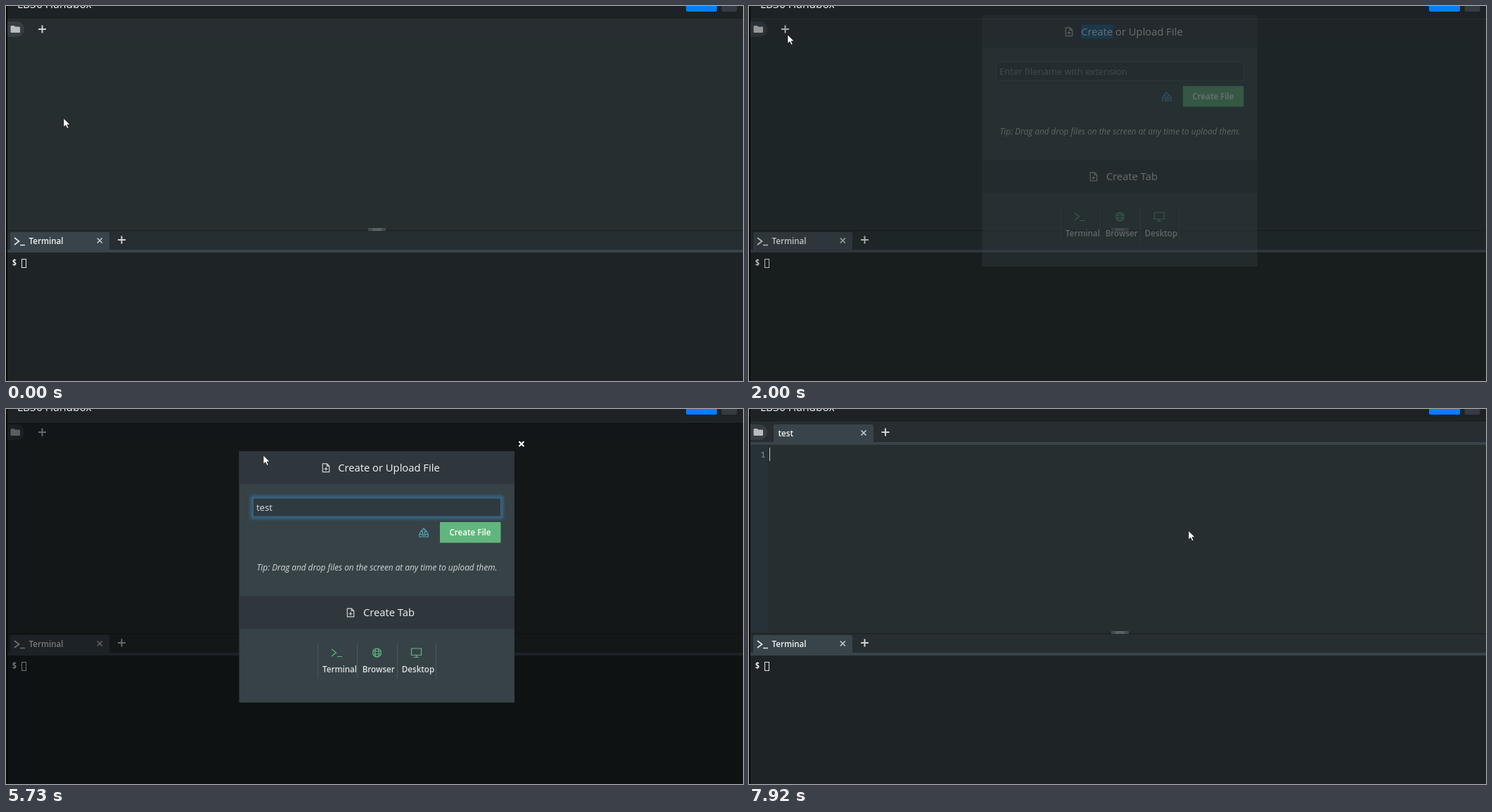
These frames come from a looping animation (1048x534 px, 8 s). An HTML page:

```html
<!DOCTYPE html>
<html lang="en">
<head>
<meta charset="utf-8">
<title>Sandbox</title>
<style>
html, body { margin: 0; width: 100%; height: 100%; overflow: hidden; background: #1e2426; }
svg { display: block; width: 1048px; height: 534px; font-family: "Open Sans", "Noto Sans", sans-serif; }
.mono { font-family: "Noto Sans Mono", monospace; font-size: 11.5px; }
.label { font-size: 11.6px; font-weight: 600; }
.head { font-size: 14.75px; fill: #f4f5f5; }
.mid { text-anchor: middle; }
.line { fill: none; stroke: #d0d3d4; }
.green { stroke: #5fb87f; stroke-width: 1.2; }
.tab { fill: #39444a; }
</style>
</head>
<body>
<svg viewBox="0 0 1048 534">
  <defs>
    <filter id="blur" x="-10%" y="-60%" width="120%" height="220%"><feGaussianBlur stdDeviation="2"/></filter>
    <path id="plus" class="line" stroke-width="2" d="M-5.5 0h11M0-5.5v11"/>
    <path id="cross" d="M-3.5-3.5l7 7m0-7l-7 7" fill="none"/>
    <path id="prompt" fill="none" d="M0 0l6.500 5-6.500 5M8 10.500h7"/>
    <g id="doc" class="line" stroke="#f0f2f2" stroke-width="1.200">
      <path d="M.6.600h6l3.400 3.400v8.400H.6zM6.600.600v3.400h3.400M5.300 5.500v5M2.800 8h5"/>
    </g>
  </defs>

  <rect width="1048" height="534" fill="#1e2426"/>
  <rect width="1048" height="19" fill="#1d2225"/>
  <text x="16" y="2.500" font-size="15.500" fill="#f0f1f1">LB36 Handbox</text>
  <rect x="967" y="-20" width="44" height="28" rx="2.500" fill="#067cff"/>
  <text class="label mid" x="989" y="0" fill="#dcebff">Share</text>
  <rect x="1017.500" y="-20" width="22" height="28" rx="2.500" fill="#353b42"/>

  <rect y="19" width="1048" height="300" fill="#262e30"/>
  <rect y="18" width="1048" height="29" fill="#272d30"/>
  <path d="M2 22h13a11 11 0 0 1 0 22H2z" fill="#353f43"/>
  <path d="M6.500 29.200q0-1.200 1.200-1.200h4l1.500 1.500h5.600q1.200 0 1.200 1.200v6.100q0 1.200-1.200 1.200H7.700q-1.200 0-1.200-1.200z" fill="#babcbd"/>
  <g id="emptyBar">
    <circle id="hover" cx="51.500" cy="33.300" r="11.700" fill="#4a4f52"/>
    <use href="#plus" x="51.500" y="33"/>
  </g>
  <g id="fileBar">
    <rect x="2" y="51" width="25" height="267" fill="#263238"/>
    <path class="tab" d="M35 47V24q0-2 2-2h138q2 0 2 2v23h871v4H2v-4z"/>
    <text class="label" x="41.500" y="39" fill="#f2f3f3">test</text>
    <use href="#cross" x="163" y="34" stroke="#c3c7c9" stroke-width="1.700"/>
    <use href="#plus" x="194" y="33"/>
    <text class="mono" x="16.500" y="68.500" fill="#929a9d">1</text>
    <path id="editCaret" d="M29.500 55v19" stroke="#c9cdcf"/>
  </g>

  <rect x="515" y="316" width="25" height="4.500" rx="1" fill="#444c50"/>
  <path d="M521 317.500h13M521 319.500h13" stroke="#7b8387" stroke-width=".8"/>
  <rect y="320.500" width="1048" height="28" fill="#262e31"/>
  <path class="tab" d="M6 347v-23q0-2 2-2h137q2 0 2 2v23h901v4H2v-4z"/>
  <use href="#prompt" x="12" y="330" stroke="#e4e6e7" stroke-width="1.600"/>
  <text class="label" x="32.500" y="339" fill="#f2f3f3">Terminal</text>
  <use href="#cross" x="133.300" y="334" stroke="#c3c7c9" stroke-width="1.700"/>
  <use href="#plus" x="164.500" y="333"/>
  <text class="mono" x="8.500" y="370" fill="#f2f2f2" font-weight="600">$</text>
  <rect x="22.500" y="360.500" width="6" height="12" fill="none" stroke="#e6e6e6"/>
  <rect width="2" height="534" fill="#050606"/>

  <g id="tip">
    <rect x="7" y="51" width="89.500" height="19.500" rx="2.500" fill="#475866"/>
    <text class="mid" x="51.700" y="64.700" font-size="10.700" fill="#fff">New File or Tab</text>
  </g>

  <rect id="dim" x="2" y="19" width="1046" height="515" fill="#000"/>

  <g id="modal">
    <rect x="331.500" y="60" width="391.500" height="358" fill="#374247"/>
    <path d="M331.500 60h391.500v46.700h-391.500zM331.500 266h391.500v47h-391.500z" fill="#2f373d"/>
    <rect id="select" x="472" y="73.500" width="45.300" height="20" fill="#145d92"/>
    <use href="#doc" x="449.700" y="77.300"/>
    <text class="head mid" x="544.500" y="88.700">Create or Upload File</text>
    <rect id="glow" x="350" y="125.500" width="355" height="29" fill="none" stroke="#3683b8" stroke-width="3" filter="url(#blur)"/>
    <rect id="field" x="351.500" y="127" width="352" height="26" fill="#2f3940"/>
    <text id="value" x="356" y="145" font-size="13.100"></text>
    <path id="caret" d="M.5 131v18" stroke="#e4e6e7"/>
    <path id="upload" fill="none" stroke-width="1.200" d="M591 175h-1.300l-2 3.500v3.500h12.600v-3.500l-2-3.500H597M587.700 178.500h3.500l.8 1.500h4l.8-1.500h3.500M592.500 178v-4h-2.200l3.700-4 3.700 4h-2.200v4z"/>
    <rect id="shade" x="617" y="163" width="87" height="28.500" fill="#000" opacity=".4" filter="url(#blur)"/>
    <rect id="button" x="617" y="161" width="86.500" height="29.500" rx="1"/>
    <text class="label mid" x="660" y="180" fill="#fff">Create File</text>
    <text class="mid" x="527.500" y="229.500" font-size="11.830" font-style="italic" fill="#d3d7d9">Tip: Drag and drop files on the screen at any time to upload them.</text>
    <use href="#doc" x="484.700" y="283.500"/>
    <text class="head mid" x="544.500" y="295">Create Tab</text>
    <path d="M443.500 333v51M499.500 333v51M556.500 333v51M611.500 333v51" stroke="#4a565c"/>
    <use href="#prompt" x="463" y="342" class="green"/>
    <g class="line green">
      <circle cx="527.500" cy="347" r="6"/>
      <ellipse cx="527.500" cy="347" rx="2.700" ry="6"/>
      <path d="M522 345h11M522 349h11M576.500 341h14v9.500h-14zM583.500 350.500v3M579.500 353.500h8"/>
    </g>
    <g class="label mid" fill="#dde0e1">
      <text x="474.500" y="375">Terminal</text>
      <text x="529.700" y="375">Browser</text>
      <text x="586" y="375">Desktop</text>
    </g>
  </g>
  <use id="close" href="#cross" x="733" y="49.700" stroke="#fff" stroke-width="2"/>

  <circle id="click" r="10" fill="#a8a50c" opacity=".92"/>
  <path id="arrow" d="M0 0v12.300l2.900-2.600 2.200 4.600 2-.9-2.100-4.500h4z" fill="#fff" stroke="#111" stroke-width=".6"/>
  <path id="hand" d="M-.6 8V1.200q0-1.200 1.100-1.200t1.200 1.200v4.300q1.900-.8 2.300.5 1.700-.6 2.200.6 2-.5 2 1.500v3q0 1.600-1.300 4H.3Q-1 12.500-3.700 9.800q-.8-1.300.4-1.800 1-.3 2.700 1.500zM1.700 5.500v3M4 6v2.700M6.200 6.600v2.200" fill="#fff" stroke="#111" stroke-width=".8"/>
</svg>
<script>
const LOOP = 8000;
const el = {};
document.querySelectorAll("[id]").forEach(e => el[e.id] = e);

// time, x, y: linear between points
const pointer = [
  [0, 82, 160], [440, 82, 160], [700, 79, 135], [950, 66, 80], [1200, 55, 42], [1280, 55, 41],
  [5419, 55, 41], [5420, 112, 46], [5479, 112, 46], [5480, 222, 56], [5729, 222, 56],
  [5730, 366, 66], [5819, 366, 66], [5820, 427, 84], [6000, 427, 84],
  [6300, 540, 125], [6600, 618, 168], [6740, 625, 173.500], [LOOP, 625, 173.500]
];
// time, rise, opacity, dimming: held until the next row
const dialog = [
  [0, 0, 0, 0],
  [1830, -48, .3, .25], [1910, -38.400, .88, .47], [2000, -47, .35, .2], [2080, 0, 0, 0],
  [3260, -47, .35, .18], [3330, -36, .85, .32], [3400, -10, 1, .42], [3480, 0, 1, .5],
  [7600, -4, .9, .48], [7680, -25, .5, .3], [7760, -44, .15, .12], [7840, 0, 0, 0]
];
const typing = [[0, ""], [4260, "t"], [4480, "te"], [4630, "tes"], [4710, "test"]];

const held = (rows, t) => rows.filter(r => r[0] <= t).pop();
const within = (t, ...spans) => spans.some(([a, b]) => t >= a && t < b);
const ramp = (t, a, b) => Math.min(1, Math.max(0, (t - a) / (b - a)));
const show = (e, on) => e.style.display = on ? "" : "none";
const attr = (e, name, v) => e.setAttribute(name, v);

function pointerAt(t) {
  const i = pointer.findIndex(p => p[0] > t);
  const a = pointer[i - 1], b = pointer[i], k = ramp(t, a[0], b[0]);
  return [a[1] + (b[1] - a[1]) * k, a[2] + (b[2] - a[2]) * k];
}

function draw(t) {
  const created = t >= 7840;
  show(el.emptyBar, !created);
  show(el.fileBar, created);
  show(el.editCaret, t >= 7920);
  show(el.hover, within(t, [1200, 1830], [2080, 3260]));
  attr(el.tip, "opacity", t < 1830 ? ramp(t, 1300, 1600) : t < 3260 ? ramp(t, 2260, 2380) : 0);

  const [, rise, opacity, dim] = held(dialog, t);
  attr(el.dim, "opacity", dim);
  attr(el.modal, "opacity", opacity);
  attr(el.modal, "transform", `translate(0 ${rise})`);
  show(el.close, within(t, [3480, 7600]));
  show(el.select, t < 2080);

  const focus = within(t, [3400, 7040]);
  attr(el.glow, "opacity", focus ? .85 : within(t, [7040, 7130]) ? .5 : t >= 7130 ? .15 : 0);
  attr(el.field, "stroke", focus ? "#3c6480" : t >= 7040 ? "#38576a" : "#47535a");
  attr(el.upload, "stroke", focus ? "#55a6b6" : "#4f9fcf");

  const text = held(typing, t)[1];
  el.value.textContent = text || "Enter filename with extension";
  attr(el.value, "fill", text ? "#dde1e3" : "#899298");
  const caretOn = within(t, [3480, 3700], [4260, 5250], [5820, 6350], [6900, 7040]);
  show(el.caret, caretOn);
  if (caretOn) {
    const x = 356 + (text ? Math.round(el.value.getComputedTextLength()) - 1 : 0);
    attr(el.caret, "transform", `translate(${x} 0)`);
  }

  const over = within(t, [6600, 7600]);
  const mix = over ? ramp(t, 6600, 6800) : 0;
  const tone = (a, b) => Math.round(a + (b - a) * mix);
  attr(el.button, "fill", `rgb(${tone(97, 128)},${tone(182, 200)},${tone(125, 154)})`);
  show(el.shade, over);

  const [x, y] = pointerAt(t);
  const place = `translate(${x} ${y})`;
  [el.arrow, el.hand, el.click].forEach(e => attr(e, "transform", place));
  show(el.hand, over);
  show(el.arrow, !over);
  show(el.click, within(t, [1830, 2000], [3260, 3400], [7040, 7130]));
}

const start = performance.now();
function tick() {
  draw((performance.now() - start) % LOOP);
  requestAnimationFrame(tick);
}
tick();
</script>
</body>
</html>
```
